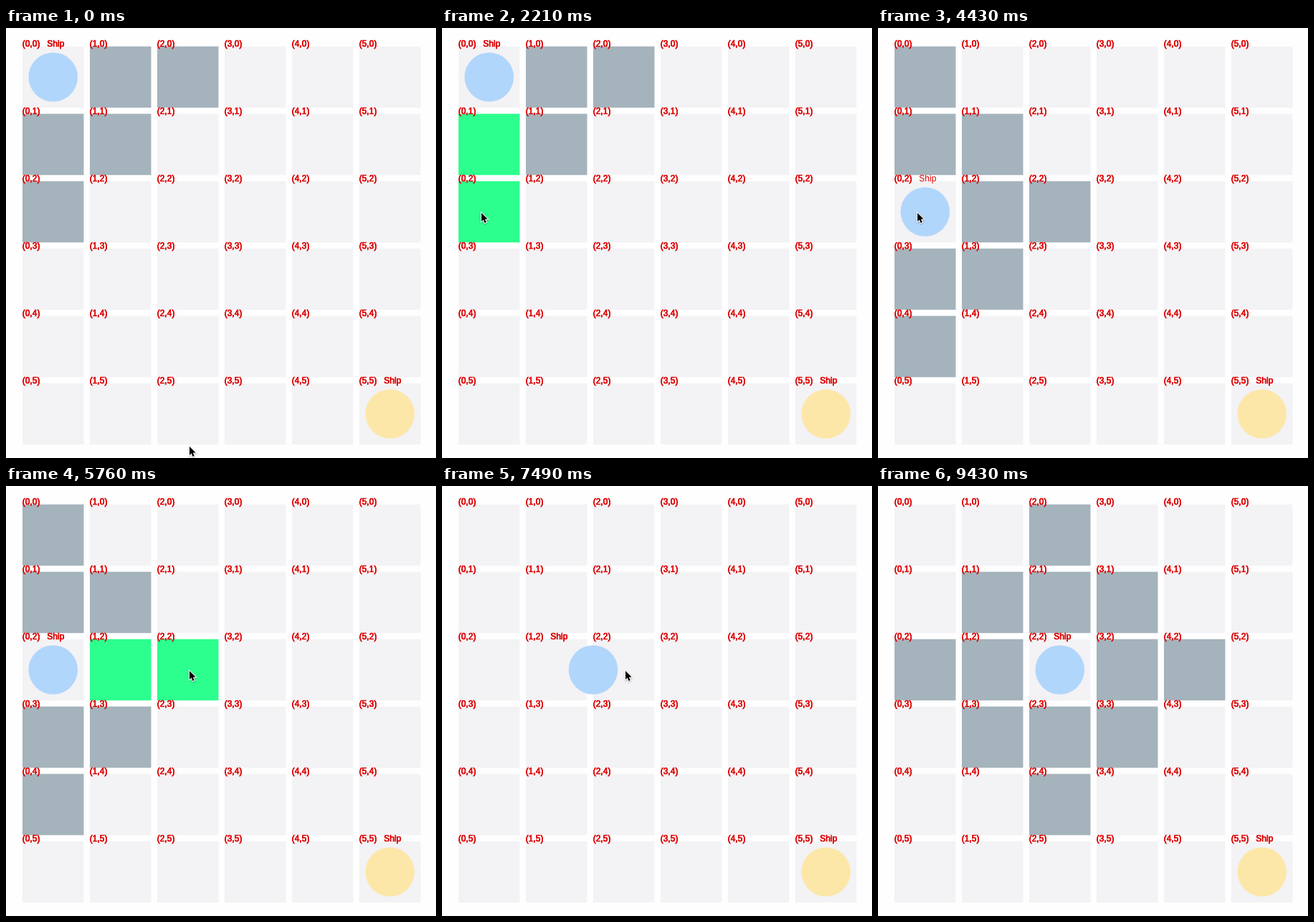
An HTML page with a canvas that plays this animation: 600x600 px, repeating every 9460 ms.

```html
<!DOCTYPE html>
<html>
<head>
<meta charset="utf-8">
<style>
  html, body { margin: 0; width: 100%; height: 100%; overflow: hidden; background: #fefefe; }
  canvas { display: block; }
</style>
</head>
<body>
<canvas id="stage" width="600" height="600"></canvas>
<script>
const ctx = document.getElementById('stage').getContext('2d');

const LOOP = 9460, TICK = 30;
const GRID = 6, PITCH = 94, SIZE = 85.5, LEFT = 23, TOP = 25.7;
const RADIUS = 34.3, RANGE = 2;
const STEP = 1040; // time the ship takes per cell
const COLORS = {
  back: '#fefefe', cell: '#f3f2f5', range: '#a5b3bc', path: '#2cff8d',
  blue: '#b1d6fb', yellow: '#fde7a8', text: '#dd0000'
};

// Each trip: highlights clear, then the ship walks from one cell to another.
const trips = [
  { clear: 2200, start: 2250, from: [0, 0], to: [0, 2] },
  { clear: 5815, start: 5863, from: [0, 2], to: [2, 2] }
];
const cursorMoves = [
  { start: 200, end: 1000, from: [256, 584], to: [55, 258] },
  { start: 4600, end: 5350, from: [55, 258], to: [256, 258] }
];
const CURSOR_HIDE = 9400;

const clamp = v => Math.max(0, Math.min(1, v));
const smooth = v => v * v * (3 - 2 * v);
const mix = (a, b, k) => a.map((v, i) => v + (b[i] - v) * k);
const same = (a, b) => a[0] === b[0] && a[1] === b[1];
const distance = (a, b) => Math.abs(a[0] - b[0]) + Math.abs(a[1] - b[1]);
const corner = ([c, r]) => [LEFT + c * PITCH, TOP + r * PITCH];

function shipState(t) {
  let state = { pos: [0, 0], cell: [0, 0], idle: true, since: -LOOP };
  for (const { clear, start, from, to } of trips) {
    if (t < clear) break;
    const cells = distance(from, to);
    const walked = Math.max(0, Math.min(cells, (t - start) / STEP));
    const reached = Math.floor(walked);
    state = {
      pos: mix(from, to, walked / cells),
      cell: mix(from, to, reached / cells),
      idle: walked === cells,
      since: reached ? start + reached * STEP : -LOOP
    };
  }
  return state;
}

function cursorAt(t) {
  let pos = cursorMoves[0].from;
  for (const m of cursorMoves) {
    if (t >= m.start) pos = mix(m.from, m.to, smooth(clamp((t - m.start) / (m.end - m.start))));
  }
  return pos;
}

function hoveredCell([x, y]) {
  return [Math.floor((x - LEFT) / PITCH), Math.floor((y - TOP) / PITCH)];
}

// Walks vertically first, then horizontally.
function pathTo(from, to) {
  const path = [];
  let [c, r] = from;
  while (r !== to[1]) path.push([c, r += Math.sign(to[1] - r)]);
  while (c !== to[0]) path.push([c += Math.sign(to[0] - c), r]);
  return path;
}

function drawCell(cell, color) {
  const [x, y] = corner(cell);
  ctx.fillStyle = color;
  ctx.fillRect(x, y, SIZE, SIZE);
}

function drawShip(cell, color) {
  const [x, y] = corner(cell);
  ctx.fillStyle = color;
  ctx.beginPath();
  ctx.arc(x + SIZE / 2, y + SIZE / 2, RADIUS, 0, Math.PI * 2);
  ctx.fill();
}

function drawText(text, x, y, heavy) {
  ctx.fillText(text, x, y);
  if (heavy) {
    ctx.fillText(text, x, y);
    ctx.strokeText(text, x, y);
  }
}

function drawLabel(cell, hasShip, heavyShip) {
  const [x, y] = corner(cell);
  drawText(`(${cell[0]},${cell[1]})`, x - 0.3, y, true);
  if (hasShip) drawText('Ship', x + 34.3, y, heavyShip);
}

function drawCursor([x, y]) {
  const outline = [[0, 0], [0, 12], [2.7, 9.5], [4.6, 14], [6.8, 13], [4.9, 8.7], [8.6, 8.5]];
  ctx.save();
  ctx.translate(x, y);
  ctx.beginPath();
  outline.forEach(p => ctx.lineTo(...p));
  ctx.closePath();
  ctx.shadowColor = 'rgba(0,0,0,0.3)';
  ctx.shadowBlur = 2;
  ctx.shadowOffsetY = 1;
  ctx.strokeStyle = '#fff';
  ctx.lineWidth = 2;
  ctx.stroke();
  ctx.shadowColor = 'transparent';
  ctx.fillStyle = '#000';
  ctx.fill();
  ctx.restore();
}

function draw(t) {
  const ship = shipState(t);
  const cursor = cursorAt(t);
  const enemy = [GRID - 1, GRID - 1];
  const target = hoveredCell(cursor);
  const reachable = ship.idle && distance(ship.cell, target) <= RANGE;
  const path = reachable ? pathTo(ship.cell, target) : [];

  const cells = [];
  for (let r = 0; r < GRID; r++) for (let c = 0; c < GRID; c++) cells.push([c, r]);

  ctx.fillStyle = COLORS.back;
  ctx.fillRect(0, 0, 600, 600);

  for (const cell of cells) {
    const d = distance(cell, ship.cell);
    let color = COLORS.cell;
    if (ship.idle && d > 0 && d <= RANGE) color = COLORS.range;
    if (path.some(p => same(p, cell))) color = COLORS.path;
    drawCell(cell, color);
  }

  drawShip(enemy, COLORS.yellow);
  drawShip(ship.pos, COLORS.blue);

  ctx.font = '12px "Liberation Sans", Arial, sans-serif';
  ctx.textBaseline = 'alphabetic';
  ctx.fillStyle = ctx.strokeStyle = COLORS.text;
  ctx.lineWidth = 0.6;
  for (const cell of cells) {
    const own = same(cell, ship.cell);
    // A fresh label starts thin and thickens shortly after.
    drawLabel(cell, own || same(cell, enemy), !own || t - ship.since > 250);
  }

  if (t < CURSOR_HIDE) drawCursor(cursor);
}

const begin = performance.now();
function frame() {
  const t = (performance.now() - begin) % LOOP;
  draw(Math.floor(t / TICK) * TICK);
  requestAnimationFrame(frame);
}
frame();
</script>
</body>
</html>
```
